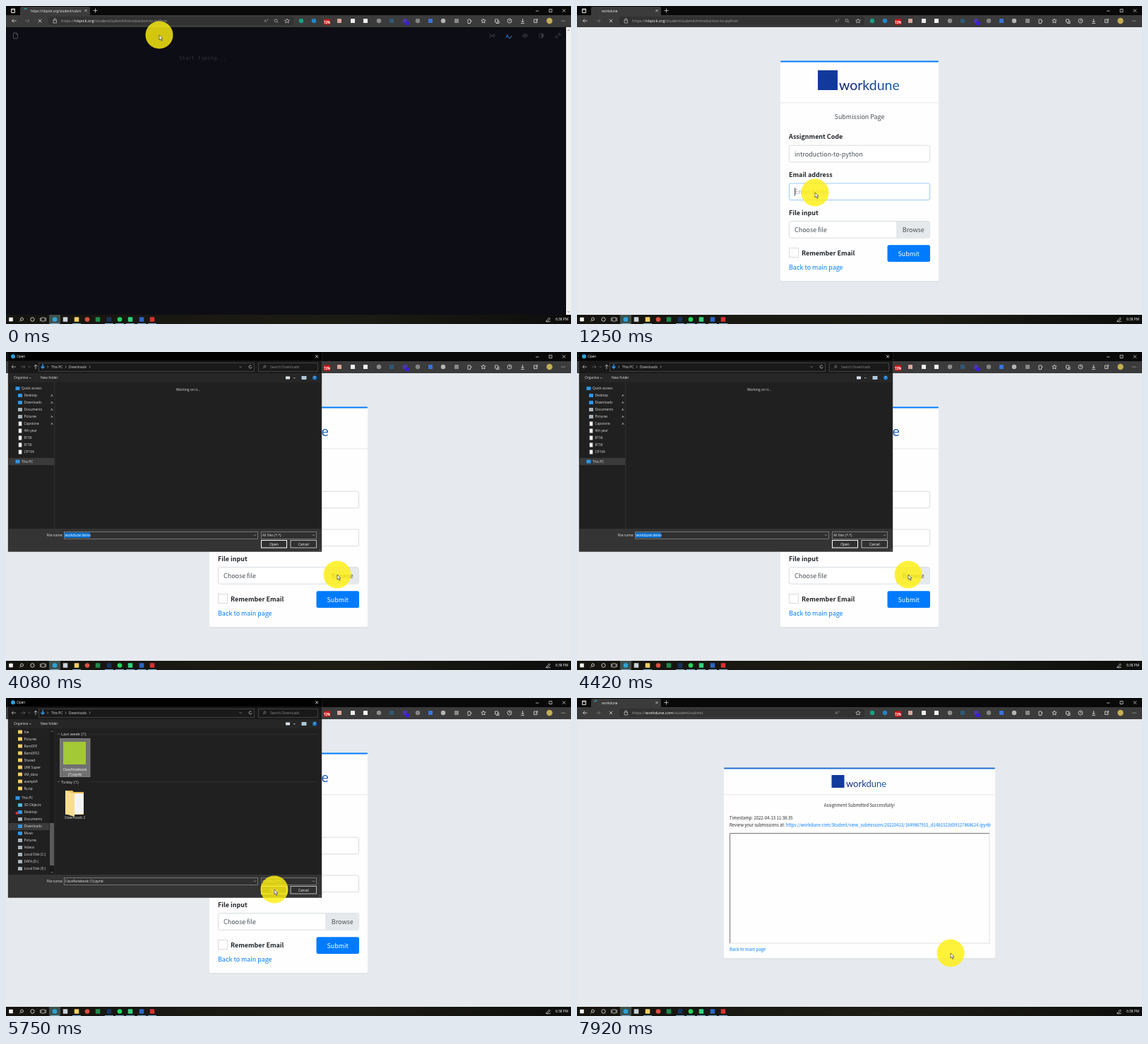
Write an HTML page that moves like this. It is 800 px wide and 450 px high and loops after 8 s.

```html
<!DOCTYPE html>
<html lang="en">
<head>
<meta charset="utf-8">
<title>Assignment submission</title>
<style>
  html, body { margin: 0; width: 100%; height: 100%; overflow: hidden; background: #e6eaee; }
  svg { display: block; width: 800px; height: 450px; font-family: "Open Sans", "Noto Sans", sans-serif; }
  .form { font-family: "Noto Sans CJK SC", "Noto Sans CJK JP", "Noto Sans CJK", "Noto Sans", sans-serif; }
  .brand { font-family: Lato, sans-serif; }
  .mono { font-family: "DejaVu Sans Mono", monospace; }
  text { white-space: pre; }
</style>
</head>
<body>
<script>
const LOOP = 8000;
const MID = 'text-anchor="middle"', BOLD = 'font-weight="700"';
const BLUE = '#007bff', INK = '#212529', GREY = '#495057', FOLDER = '#f3cf62', PALE = '#dcdcdc';
const SITE = 'workdune';
const EMAIL = 'learner27@abc.test';
const FILE = 'ClassNotebook (1).ipynb';

// Drawing helpers
const rect = (x, y, w, h, fill, more = '') => `<rect x="${x}" y="${y}" width="${w}" height="${h}" fill="${fill}" ${more}/>`;
const box = (x, y, w, h, fill, stroke, r = 0) =>
  rect(x + .5, y + .5, w - 1, h - 1, fill, `stroke="${stroke}" stroke-width=".8" rx="${r}"`);
const dot = (x, y, r, fill, more = '') => `<circle cx="${x}" cy="${y}" r="${r}" fill="${fill}" ${more}/>`;
const ring = (x, y, r, stroke) => dot(x, y, r, 'none', `stroke="${stroke}" stroke-width=".8"`);
const line = (d, stroke = '#ddd', w = .8, more = '') => `<path d="${d}" fill="none" stroke="${stroke}" stroke-width="${w}" ${more}/>`;
const text = (x, y, size, str, fill, more = '') => `<text x="${x}" y="${y}" font-size="${size}" fill="${fill}" ${more}>${str}</text>`;
const group = (id, ...parts) => `<g id="${id}">${parts.join('')}</g>`;
const square = (x, y, s, fill) => rect(x - s / 2, y - s / 2, s, s, fill, 'rx=".6"');
const cross = (x, y, r, stroke) => line(`M${x - r} ${y - r}l${2 * r} ${2 * r}m0 ${-2 * r}l${-2 * r} ${2 * r}`, stroke);
const url = (id, host, path) => group(id, text(78, 23.1, 5.6,
  `https://<tspan fill="#fff">${host}</tspan>${path}`, '#a5a5a5'));

function browser() {
  const tools = [[418, '#16a085', 1], [436, '#2385c5', 1], [472, '#d9a79b'], [491, '#eee'], [509, '#f5f5f5'],
    [528, '#8d8d8d', 1], [546, '#2f5876'], [565, '#4b35a8'], [583, '#858585', 1], [601, '#3a72d8'],
    [619, '#b5b5b5', 1], [638, '#888']];
  return [
    rect(0, 0, 800, 14, '#090909'),
    rect(0, 13, 800, 17, '#3b3b3b'),
    '<path d="M18 14q2 0 2-2V3q0-2 2-2h95q2 0 2 2v9q0 2 2 2z" fill="#3b3b3b"/>',
    line('M7.5 4h5v5.500h-5zM7.500 5.200h5', '#ddd', 1),
    cross(113, 6.5, 1.7, '#ccc'), line('M123.500 6.500h6m-3-3v6', '#ccc'),
    line('M750 7h4.500', '#ccc'), line('M769 4.500h4v4h-4z', '#ccc'), cross(790, 6.5, 2.2, '#ccc'),
    line('M14.500 21h-6l2.500-2.500m-2.500 2.500l2.500 2.500', '#ddd'),
    line('M27 21h6l-2.500-2.500m2.500 2.500l-2.500 2.500', '#777'),
    rect(60, 15, 347, 12, '#323232', 'rx="2"'),
    line('M67 20h4.500v4H67zM67.800 20v-1.500q1.400-2 2.900 0V20', '#ccc', .7),
    text(365.500, 23, 5.5, 'A', '#aaa'), line('M370 18q1.500 1 0 3', '#aaa', .6),
    group('zoom', ring(382, 20.5, 2, '#aaa'), line('M383.500 22l2 2', '#aaa')),
    line('M398 18l1 2 2.400.2-1.800 1.500.600 2.300-2.200-1.300-2.200 1.300.600-2.300-1.800-1.500 2.400-.2z', '#ccc', .7),
    tools.map(([x, c, round]) => round ? dot(x, 21, 3.2, c) : square(x, 21, 6, c)).join(''),
    rect(450, 18.500, 9, 8, '#d01818', 'rx="1"'),
    group('pct', text(454.500, 25, 4.5, '72%', '#fff', MID + BOLD)),
    rect(565, 22, 6, 5, '#3a1fd0', 'rx="1"'),
    line('M654 19h3.500v1.500q2-.5 1.500 1.500l-1.500.5v2H654z'),
    line('M676 18l1 2 2.200.2-1.700 1.500.500 2.300-2-1.300-2 1.300.500-2.300-1.700-1.500 2.200-.2zM692.500 19h4v4h-4zM694 24.500h4v-4'),
    ring(713, 21, 3, '#ddd'), line('M713 19v2h1.500M731.500 18v5m-2-2l2 2 2-2M729 24.500h5M747.500 19h4.500v4.500h-4.500zM750 22l3-4'),
    dot(769.500, 21, 4.2, '#c3ae55'),
    [787, 789, 791].map(x => dot(x, 21, .6, '#ddd')).join(''),
    group('tabUrl', text(35, 8.6, 4.7, 'https://nbpick.org/student/subm', '#eee')),
    group('tabName', text(35, 8.6, 4.8, SITE, '#eee')),
    group('tabIcon', square(28, 6.5, 4.5, '#1b4a9c')),
    group('spinner', line('M0 -2.800a2.800 2.800 0 0 1 2.800 2.800', '#35c6c0', 1.1)),
    group('stop', cross(48, 21, 2.2, '#ddd')),
    group('reload', line('M50.300 19.300a3 3 0 1 0 .7 2.200M51 17.800v2h-2', '#ddd', .9)),
    url('urlForm', 'nbpick.org', '/student/submit/introduction-to-python'),
    url('urlDone', SITE + '.com', '/student/submit'),
  ].join('');
}

function taskbar() {
  const apps = [[69, '#2aa3d8', 1], [84, '#c9d2d8'], [100, FOLDER], [115, '#d8503e', 1], [130, '#1f8a4c'],
    [146, '#16345f'], [161, '#1ed760', 1], [176, '#35d07f'], [192, '#2a66c8'], [207, '#d93030']];
  return [
    rect(0, 437, 800, 13, 'url(#bar)'), rect(61, 437, 16, 13, '#40504c'),
    square(7, 443.500, 5.500, '#fff'),
    ring(22.500, 443, 2, '#eee'), line('M21 444.500l-2 2', '#eee'), ring(37.500, 443.500, 2.700, '#eee'),
    line('M50 441h5v5h-5zM48.500 441v5M56.500 441v5', '#ddd', .7),
    apps.map(([x, c, round], i) => (round ? dot(x, 443.500, 3.300, c) : square(x, 443.500, 6.500, c)) +
      ([1, 3, 4].includes(i) ? '' : rect(x - 6, 449, 12, 1, '#7fb2d8'))).join(''),
    line('M765 446l4-5 1.500 1.500-4 4zM764 446q4 2 7 0', '#ddd', .7),
    text(778, 445.400, 4.8, '6:38 PM', '#fff'),
  ].join('');
}

function editor() {
  const g = '#363943';
  return group('editor', rect(0, 29.500, 800, 408, '#0d0d15'),
    line('M10.500 38h4l2 2v6h-6zM14.500 38v2h2', '#5b5e66', .8),
    text(245, 76, 7.400, 'Start typing...', '#30323a', 'class="mono"'),
    line('M684 39l4 3-4 3M692 39l-3 3 3 3m-7-3h8', g, 1),
    text(707.500, 44.500, 7, 'A', '#3b8fe0'), line('M711 44l2 2 3.500-4', '#3b8fe0', 1),
    line('M731 42q4-5 8 0-4 5-8 0z', g, 1), dot(735, 42, 1.4, g),
    ring(758, 42, 3.200, g), '<path d="M758 38.800a3.200 3.200 0 0 1 0 6.400z" fill="#363943"/>',
    line('M778.500 45l6-6m-3 0h3v3m-6 0v3h3', g, 1),
    rect(793, 29.500, 7, 408, '#f0f0f0'), line('M795 35l1.500-1.500 1.500 1.500M795 432l1.500 1.500 1.500-1.500', '#555'));
}

const card = (x, y, w, h, rule) => rect(x, y + .8, w, h, '#b9bfc6', 'rx="2" opacity=".7"') +
  rect(x, y, w, h, '#fefefe', 'rx="2"') + rect(x, y, w, 2, rule, 'rx="1"') + rect(x, 136.500, w, .8, '#dfe1e4');
const brand = (x, y, size, fontSize, textX, base) =>
  rect(x, y, size, size, '#123a9c') + text(textX, base, fontSize, SITE, 'url(#ink)', 'class="brand"');

function form() {
  const label = (y, s) => text(300, y, 8.95, s, INK, BOLD);
  const field = (y, id) => `<rect id="${id}" x="300.400" y="${y}" width="199.200" height="23.600" rx="2.500" fill="#fff" stroke="#ced4da" stroke-width=".8"/>`;
  return `<g id="form" class="form">` + [
    card(288, 77.500, 224, 312, BLUE), brand(341, 91, 28, 19.500, 371, 119),
    text(400, 160.300, 8.95, 'Submission Page', GREY, MID),
    label(188, 'Assignment Code'), field(197.200, 'codeBox'), text(308, 212.500, 8.95, 'introduction-to-python', GREY),
    label(241.700, 'Email address'), field(251, 'emailBox'),
    '<text id="email" x="308" y="266.200" font-size="8.950"></text>',
    rect(308, 257, .7, 12, '#222', 'id="caret"'),
    label(295.500, 'File input'),
    field(304.600, 'fileBox'),
    '<path d="M453 305h44.500q2 0 2 2v18.800q0 2-2 2H453z" fill="#e6e9ec"/>', line('M453 305v22.800', '#ced4da'),
    '<text id="file" x="308" y="319.800" font-size="8.950" fill="#495057"></text>',
    text(476.300, 319.800, 8.95, 'Browse', GREY, MID),
    box(300, 342, 14, 14, '#fff', '#d0d3d6'),
    text(318, 353, 8.95, 'Remember Email', INK, BOLD),
    rect(439.500, 338.200, 60.500, 23.800, BLUE, 'id="submit" rx="2.500"'),
    text(469.700, 354, 8.95, 'Submit', '#fff', MID),
    text(300, 373, 8.95, 'Back to main page', BLUE),
  ].join('') + '</g>';
}

function result() {
  const size = 5.97;
  return '<g id="result" class="form">' + [
    card(208, 98.500, 384, 270, '#1f6fd6'), brand(360.500, 109, 18, 13, 381, 126),
    text(400, 154, size, 'Assignment Submitted Successfully!', INK, MID),
    text(216, 172.300, size, 'Timestamp: 2022-04-13 11:38:35', INK),
    text(216, 182.300, size, `Review your submissions at: <tspan fill="${BLUE}">https://${SITE}.com/Student/view_submission/20220413/1649867915_d14b1523d39127868624.ipynb</tspan>`, INK),
    line('M584 191.500v155.500H216', '#dedede', 1), line('M216.500 347V191.500H584', '#777', 1),
    text(216, 357.500, size, 'Back to main page', BLUE),
  ].join('') + '</g>';
}

// Each row is "icon colour|label"; top-level rows sit slightly to the left
const rows = (y, list) => list.map((row, i) => {
  const [color, name] = row.split('|'), x = /Quick|This PC/.test(name) ? 16.500 : 20;
  const cy = y + i * 10;
  return (color === '#eee' ? rect(x - 2.200, cy - 3, 4.500, 6, color) : rect(x - 3, cy - 2.500, 6, 5, color, 'rx=".600"')) +
    text(x + 5.500, cy + 1.700, 4.8, name, PALE);
}).join('');

function dialog() {
  const f = FOLDER, b = '#2f95e6', w = '#eee', d = '#aab4bb';
  const heading = (y, s) => line(`M73 ${y - 3}l1.500 1.500 1.500-1.500`, '#aaa', .6) + text(78, y, 5.9, s, PALE) +
    rect(118, y - 2, 322, .6, '#383838');
  return group('dialog',
    rect(3, 0, 444, 282.500, '#202020', 'stroke="#555" stroke-width=".5"'),
    rect(3, 0, 444, 12.500, '#000'), rect(3, 12.500, 444, 17.500, '#191919'),
    rect(3, 30, 444, 13, '#262626'), rect(3, 250, 444, 32, '#343434'),
    dot(10, 6.300, 3, '#2aa3d8'), text(15, 8.200, 4.8, 'Open', '#fff'), cross(440, 6.300, 2, '#fff'),
    line('M14 21H8l2.300-2.300M8 21l2.300 2.300', '#bbb'), line('M21 21h6l-2.300-2.300M27 21l-2.300 2.300', '#666'),
    line('M31.500 20.300l1.500 1.500 1.500-1.500', '#888', .6), line('M42 24v-6l-2.500 2.500M42 18l2.500 2.500', '#ccc'),
    box(46, 15, 306, 13, '#191919', '#4b4b4b'), box(357, 15, 85, 13, '#191919', '#4b4b4b'),
    line('M52 17v6m-2.500-2.500l2.500 2.500 2.500-2.500', b, 1.500),
    line('M58.500 19.500l1.300 1.500-1.300 1.500M84 19.500l1.300 1.500-1.300 1.500M118 19.500l1.300 1.500-1.300 1.500M330.500 20.300l1.500 1.500 1.500-1.500', '#bbb', .6),
    text(64, 22.700, 4.8, 'This PC', PALE), text(89, 22.700, 4.8, 'Downloads', PALE),
    line('M347.500 19.500a2 2 0 1 0 .5 1.800', '#ccc'),
    ring(366.500, 20.500, 1.500, '#888'), line('M365.500 21.700l-1.500 1.500', '#888'),
    text(374, 22.700, 4.8, 'Search Downloads', '#888'),
    text(11, 38.300, 4.8, 'Organise', PALE), line('M33 36l1.300 1.300 1.300-1.300', PALE, .6), text(49, 38.300, 4.8, 'New folder', PALE),
    rect(396, 34.500, 6, 4, '#d8e2e8'), line('M407 36l1.300 1.300 1.300-1.300', PALE, .8),
    box(418.500, 34, 7, 5, '#9cc7e8', '#ddd'), dot(437, 36.600, 3, '#1677d2'), text(437, 38.400, 4.800, '?', '#fff', MID),
    rect(68.500, 43, .7, 207, '#3a3a3a'),
    text(57.500, 260.700, 4.8, 'File name:', PALE),
    box(82, 254, 275, 11, '#303030', '#858585'), box(361, 254, 79, 11, '#303030', '#858585'),
    line('M351 258.500l1.500 1.500 1.500-1.500M434 258.500l1.500 1.500 1.500-1.500', '#ccc', .6),
    text(363, 260.900, 4.8, 'All files (*.*)', PALE),
    rect(361.500, 266.500, 36, 10.500, '#303030', 'stroke="#fff"'), rect(403, 266.500, 36.500, 10.500, '#303030', 'stroke="#ddd" stroke-width=".8"'),
    text(379.500, 273.500, 4.8, 'Open', '#fff', MID), text(421.300, 273.500, 4.8, 'Cancel', '#fff', MID),
    dot(444.500, 280, .700, '#999'),
    group('working',
      rect(3.500, 150, 65, 10, '#3a3a3a'),
      rows(51.500, [b + '|Quick access', b + '|Desktop', b + '|Downloads', d + '|Documents', d + '|Pictures',
        ...['Capstone', '4th year', '8156', '8156', 'CP194'].map(s => w + '|' + s)]),
      [0, 1, 2, 3, 4].map(i => line(`M63.500 ${63 + i * 10}l1.500-1.500m-1-1.500l2.500 2.500`, '#bbb', 1)).join(''),
      rows(155, [b + '|This PC']),
      text(258, 54.700, 4.900, 'Working on it...', PALE, MID)),
    group('oldName', rect(83, 255.500, 36, 7.500, '#0a74d4'), text(83.500, 260.900, 4.8, SITE + ' demo', '#fff')),
    group('listing',
      rect(3.500, 177, 58, 10, '#3a3a3a'),
      rows(48, [...['Ine', 'Pictures', 'RemOFF', 'RemOFF2', 'Shared', 'UMi Super', 'VM_data', 'wamp64', 'fb.zip'].map(s => f + '|' + s)]),
      rows(141.500, [b + '|This PC', '#4ab7d8|3D Objects', b + '|Desktop', d + '|Documents', b + '|Downloads',
        b + '|Music', d + '|Pictures', d + '|Videos', d + '|Local Disk (C:)', d + '|DATA (D:)', d + '|Local Disk (E:)']),
      dot(15.500, 163, 2, '#e03030'),
      rect(61.500, 43, 7, 207, '#1b1b1b'), rect(62, 177, 6, 60, '#5a5a5a'),
      line('M63.500 48l1.500-1.500 1.500 1.500M63.500 246l1.500 1.500 1.500-1.500', '#999'),
      heading(53, 'Last week (1)'), heading(120.500, 'Today (1)'),
      group('picked', box(76, 57, 43.500, 55, '#707070', '#8a8a8a')),
      rect(81, 62, 32, 32, '#a3c936'),
      text(97.700, 103, 4.8, 'ClassNotebook', '#fff', MID), text(97.700, 109.500, 4.8, '(1).ipynb', '#fff', MID),
      '<path d="M84 131h10l2 2h14v32H84z" fill="#e8bd52"/><path d="M92 135h18v29l-18 1z" fill="#f4f4f4"/><path d="M84 131l13 4v33l-13-4z" fill="#f8de8e"/>',
      text(97.700, 171.300, 4.8, 'Downloads 2', PALE, MID)),
    group('newName', text(83.500, 260.900, 4.8, FILE, '#eee')));
}

document.body.innerHTML = `<svg viewBox="0 0 800 450">
  <defs>
    <linearGradient id="ink"><stop stop-color="#0c1d6e"/><stop offset="1" stop-color="#1a62b8"/></linearGradient>
    <linearGradient id="bar"><stop stop-color="#16140f"/><stop offset=".6" stop-color="#1d1c14"/><stop offset="1" stop-color="#0d0d0c"/></linearGradient>
  </defs>
  ${rect(0, 0, 800, 450, '#e6eaee')}${form()}${result()}${editor()}${browser()}${taskbar()}${dialog()}
  ${group('pointer', dot(0, 0, 19.500, '#fff010', 'opacity=".82"'),
    '<path d="M0 0v7l1.600-1.500 1.300 2.900 1.200-.5-1.300-2.800h2.300z" fill="#fff" stroke="#222" stroke-width=".6"/>')}
</svg>`;

const $ = id => document.getElementById(id);
const show = (id, on) => { $(id).style.display = on ? '' : 'none'; };

// Pointer stops: time, x, y
const stops = [[0, 217, 41], [200, 217, 41], [1000, 337, 264], [3500, 337, 264], [3830, 469, 315], [4430, 469, 315],
  [4900, 105, 77], [5050, 105, 77], [5683, 380, 271], [5960, 380, 271], [6509, 472, 348], [6830, 472, 348],
  [7560, 529, 361], [LOOP, 529, 361]];
const keyTimes = [1320, 1400, 1480, 1550, 1610, 1660, 1740, 1740, 1820, 2080, 2570, 2660, 2740, 2820, 3160, 3240, 3410, 3490];

function pointerAt(t) {
  const i = stops.findIndex(s => s[0] > t);
  const [t0, x0, y0] = stops[i - 1], [t1, x1, y1] = stops[i];
  const u = (t - t0) / (t1 - t0), p = u * u * (3 - 2 * u);
  return [x0 + (x1 - x0) * p, y0 + (y1 - y0) * p];
}

function render(t) {
  const loaded = t >= 400, done = t >= 7740, chosen = t >= 5850;
  const open = t >= 4000 && !chosen, listed = t >= 4580, picked = t >= 4970;
  const typing = t >= 980 && t < 3700, loading = t < 1600 || t >= 6830;

  show('editor', !loaded);
  show('form', loaded && !done);
  show('result', done);
  show('tabUrl', !loaded);
  show('tabName', loaded);
  show('tabIcon', !loading);
  show('spinner', t < 900 || t >= 6830);
  $('spinner').setAttribute('transform', `translate(27.500 6.500) rotate(${t * .36 - 45})`);
  show('stop', loading);
  show('reload', !loading);
  show('urlForm', !done);
  show('urlDone', done);
  show('zoom', !done);

  show('dialog', open);
  show('working', !listed);
  show('listing', listed);
  show('picked', picked);
  show('oldName', !picked);
  show('newName', picked);

  const typed = EMAIL.slice(0, keyTimes.filter(k => k <= t).length);
  const email = $('email');
  email.textContent = typed || 'Enter email';
  email.setAttribute('fill', typed ? GREY : '#9aa1a8');
  show('caret', typing);
  if (typing) $('caret').setAttribute('x', 308 + (typed ? email.getComputedTextLength() : 0));
  $('emailBox').setAttribute('stroke', typing ? '#80bdff' : '#ced4da');
  $('fileBox').setAttribute('stroke', chosen && t < 6750 ? '#80bdff' : '#ced4da');
  $('file').textContent = chosen ? FILE : 'Choose file';
  $('submit').setAttribute('fill', t >= 6280 && t < 7250 ? '#0069d9' : BLUE);

  $('pointer').setAttribute('transform', `translate(${pointerAt(t)})`);
}

function tick() {
  render(performance.now() % LOOP);
  requestAnimationFrame(tick);
}
tick();
</script>
</body>
</html>
```
